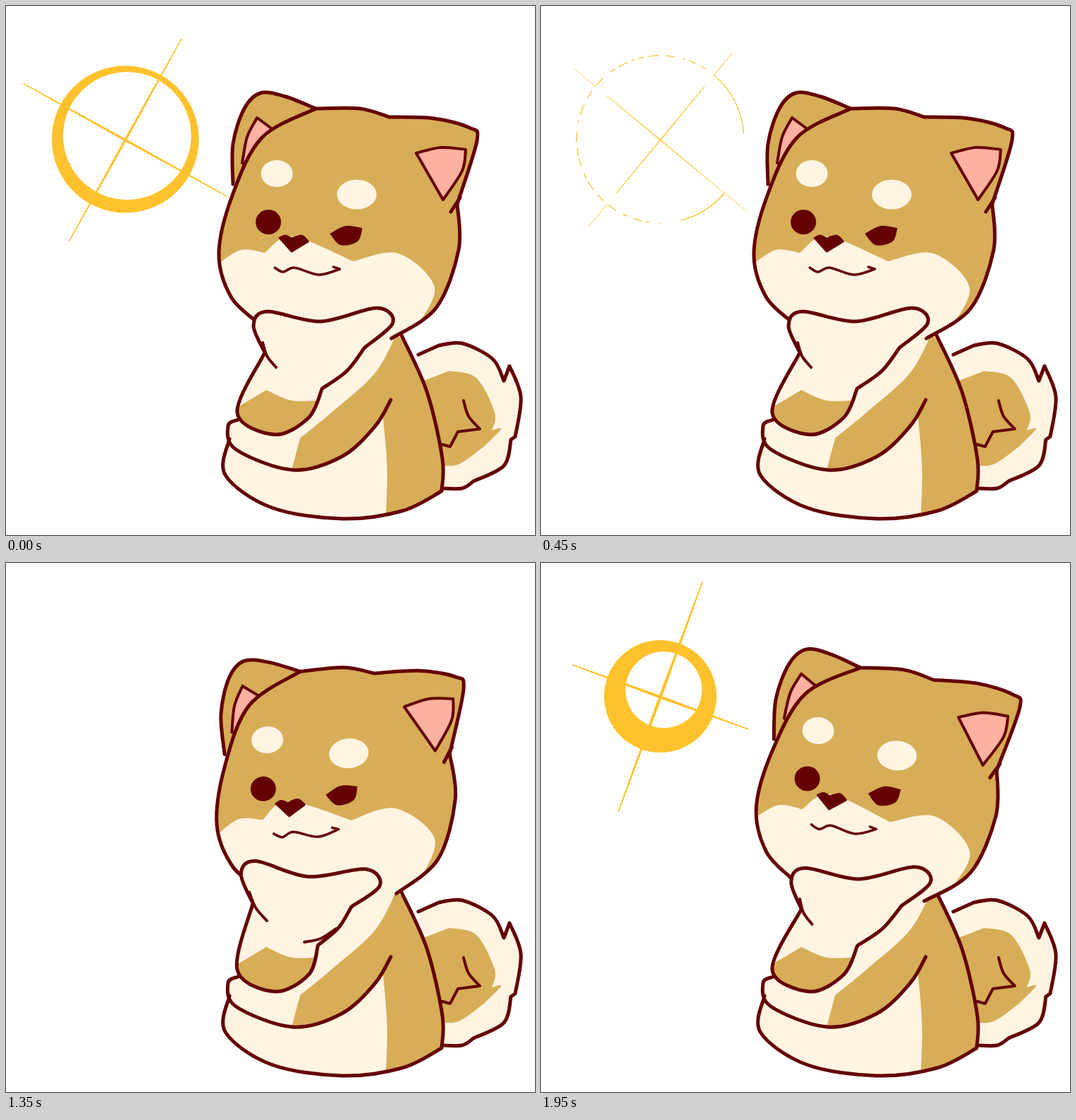
These frames come from a looping animation (748 px wide and 748 px high, 2100 ms). An HTML page with a canvas:

```html
<!DOCTYPE html>
<html lang="en">
<head>
<meta charset="utf-8">
<title>Thinking dog</title>
<style>
html, body { margin: 0; width: 100%; height: 100%; overflow: hidden; background: #fff; }
canvas { display: block; }
</style>
</head>
<body>
<canvas id="stage" width="748" height="748"></canvas>
<script>
const ctx = document.getElementById('stage').getContext('2d');
const TAN = '#d7ad57', CREAM = '#fff4e2', DARK = '#640000', PINK = '#ffb1a1', GOLD = '#ffc22c';
const STEP = 150, STEPS = 14;
const rad = deg => deg * Math.PI / 180;
const clamp = v => Math.max(0, Math.min(1, v));

// Smooth path through a few key points; a slash makes a corner.
function trace(text, move = p => p) {
  const path = new Path2D();
  let last = null;
  for (const part of text.split('/')) {
    const pts = part.trim().match(/\S+ \S+/g).map(p => move(p.split(' ').map(Number)));
    if (last) pts.unshift(last);
    else path.moveTo(...pts[0]);
    const at = i => pts[Math.max(0, Math.min(pts.length - 1, i))];
    for (let i = 0; i < pts.length - 1; i++) {
      const [a, b, c, d] = [-1, 0, 1, 2].map(k => at(i + k));
      path.bezierCurveTo(b[0] + (c[0] - a[0]) / 6, b[1] + (c[1] - a[1]) / 6,
        c[0] - (d[0] - b[0]) / 6, c[1] - (d[1] - b[1]) / 6, ...c);
    }
    last = pts.at(-1);
  }
  return path;
}

function fill(path, color) {
  ctx.fillStyle = color;
  ctx.fill(path);
}

function line(path, width = 5) {
  ctx.strokeStyle = DARK;
  ctx.lineWidth = width;
  ctx.stroke(path);
}

function patch(shape, area, color) {
  ctx.save();
  ctx.clip(shape);
  fill(area, color);
  ctx.restore();
}

function oval(x, y, rx, ry, color) {
  const path = new Path2D();
  path.ellipse(x, y, rx, ry, 0, 0, 7);
  fill(path, color);
}

const tail = {
  edge: trace('583 493 612 480 / 645 477 688 499 704 530 / 712 509 / 728 553 720 609 / 714 613 / 704 650 661 672 / 645 682 617 682'),
  patch: trace('585 532 627 516 / 665 526 691 575 687 600 / 700 598 677 622 / 640 648 610 649'),
  curl: trace('647 558 654 580 670 598 / 639 602 / 628 623 / 617 620')
};

const torso = '316 612 310 663 375 709 475 725 560 714 616 686 / 617 640 595 545 558 463';
const body = {
  edge: trace(torso),
  fill: trace(torso + ' / 500 440 / 370 480 / 370 590 / 328 585 314 594 316 612'),
  patch: trace('552 464 521 520 460 575 416 611 / 404 656 / 475 637 533 580 / 539 660 535 760 / 650 760 / 650 560'),
  arm: trace('328 585 314 594 325 627 405 656 475 637 522 594 544 557')
};

const head = {
  backEar: trace('321 252 321 195 337 145 360 123 395 128 438 145'),
  backPink: trace('334 222 341 185 355 158 / 382 178'),
  edge: trace('355 447 318 411 301 350 320 268 362 186 438 145 / 500 145 542 157 / 605 159 655 172 666 190 638 280 / 640 345 608 427 545 470'),
  earEnd: trace('642 271 629 291'),
  frontPink: trace('580 208 615 200 650 203 / 645 233 618 274 / 580 208'),
  muzzle: trace('298 366 332 345 366 349 / 405 326 491 361 / 555 350 606 398 578 457 / 545 480 / 340 480'),
  wink: trace('458 322 480 311 504 314 / 497 333 473 338 458 322'),
  nose: trace('387 328 395 325 404 329 / 418 325 427 333 / 404 347 / 387 328'),
  mouth: trace('380 370 392 376 408 370 442 380 472 372 / 463 369')
};

const PAW = '366 490 350 452 369 432 445 446 524 427 547 448 507 483 / 482 516 447 541 / 428 582 380 606 327 575 366 490';
const CREASE = '363 476 369 495 382 511';
const cuff = trace('318 573 368 543 / 405 558 450 557 / 450 620 / 318 620');

// The paw follows the chin; the shift fades out towards the elbow.
function pawShift(turn, dx, dy) {
  const cos = Math.cos(rad(turn)), sin = Math.sin(rad(turn));
  return ([x, y]) => {
    const u = x - 450, v = y - 440, k = clamp((560 - y) / 90);
    return [x + k * (u * cos - v * sin - u + dx), y + k * (u * sin + v * cos - v + dy)];
  };
}

function makePose(turn, pivot, shift, hatch) {
  return { turn, pivot, hatch: hatch && trace(hatch), paw: trace(PAW, shift), crease: trace(CREASE, shift) };
}

const rest = makePose(0, [0, 0]);
const back = makePose(-5.2, [520, 392], pawShift(6, -17, -2), '422 536 445 531 467 517');
const lean = makePose(2.9, [386, 414], pawShift(1.3, 4, 1));

function drawBody() {
  fill(tail.edge, CREAM);
  patch(tail.edge, tail.patch, TAN);
  line(tail.edge);
  line(tail.curl, 4);
  fill(body.fill, CREAM);
  patch(body.fill, body.patch, TAN);
  line(body.edge);
  line(body.arm);
}

function drawHead({ turn, pivot: [x, y] }) {
  ctx.save();
  ctx.translate(x, y);
  ctx.rotate(rad(turn));
  ctx.translate(-x, -y);
  fill(head.backEar, TAN);
  fill(head.backPink, PINK);
  line(head.backPink, 4);
  line(head.backEar);
  fill(head.edge, TAN);
  patch(head.edge, head.muzzle, CREAM);
  fill(head.frontPink, PINK);
  line(head.frontPink, 4);
  line(head.edge);
  line(head.earEnd);
  oval(383, 237, 22.5, 19, CREAM);
  oval(496, 266.5, 28, 21, CREAM);
  oval(371, 305.5, 18, 17.5, DARK);
  fill(head.wink, DARK);
  fill(head.nose, DARK);
  line(head.nose, 3);
  line(head.mouth, 3.5);
  ctx.restore();
}

function drawPaw({ paw, crease, hatch }) {
  fill(paw, CREAM);
  patch(paw, cuff, TAN);
  line(paw);
  line(crease, 4);
  if (hatch) line(hatch, 4);
}

// Spark: tilt and ray lengths at each stage of its life.
const TILT = [10, 20.1, 29, 37, 38.8, 39.6, 39.8];
const TALL = [143, 173, 164, 160, 159, 159, 159];
const WIDE = [77, 133, 165, 158, 165, 159, 159];
const BREAK = 5;

function drawRing(age) {
  const R = 119 - 39.5 * 0.38 ** (age - 1);
  const gap = 25.5 * 0.53 ** (age - 1);
  const hole = Math.max(0, R - gap);
  ctx.beginPath();
  ctx.arc(0, -1, R, 0, 7);
  if (hole) {
    ctx.moveTo(gap * 0.19 + hole, -gap * 0.36);
    ctx.arc(gap * 0.19, -gap * 0.36 - 1, hole, 0, 7);
  }
  ctx.fill('evenodd');
}

// Two whole arcs stay; the rest falls into random dashes.
function drawBrokenRing(age) {
  let seed = 7;
  const random = () => (seed = seed * 16807 % 2147483647) / 2147483647;
  const arc = (from, to) => {
    ctx.beginPath();
    ctx.arc(0, -1, 118.3, rad(from), rad(to));
    ctx.stroke();
  };
  if (age === BREAK) {
    arc(-50, -4);
    arc(40, 76);
  }
  for (let a = 90; a < 300; ) {
    const end = a + 1 + random() * (age === BREAK ? 7 : 3);
    arc(a, end);
    a = end + 1 + random() * 6;
  }
}

function drawRay(length, width, broken) {
  ctx.beginPath();
  ctx.moveTo(0, -width);
  ctx.lineTo(length, -width * 0.4);
  ctx.lineTo(length, width * 0.4);
  ctx.lineTo(0, width);
  ctx.fill();
  if (broken) {
    ctx.fillStyle = '#fff';
    ctx.fillRect(98, -3, 19, 6);
    ctx.fillStyle = GOLD;
  }
}

function drawSpark(age) {
  const broken = age >= BREAK;
  ctx.save();
  ctx.fillStyle = ctx.strokeStyle = GOLD;
  ctx.lineWidth = age > BREAK ? 0.8 : 1.3;
  ctx.lineCap = 'butt';
  ctx.translate(168.7, 189.5);
  ctx.save();
  ctx.rotate(rad(TILT[age]));
  for (let i = 0; i < 4; i++) {
    drawRay((i % 2 ? TALL : WIDE)[age], Math.max(0.7, 2.6 - 0.4 * age), broken && i > 0);
    ctx.rotate(Math.PI / 2);
  }
  ctx.restore();
  (broken ? drawBrokenRing : drawRing)(age);
  ctx.restore();
}

function draw(time) {
  const step = Math.floor(time / STEP) % STEPS;
  const age = (step + 2) % STEPS;
  const pose = step >= 12 ? lean : step === 9 || step === 10 ? back : rest;
  ctx.fillStyle = '#fff';
  ctx.fillRect(0, 0, 748, 748);
  ctx.lineCap = ctx.lineJoin = 'round';
  if (age < TILT.length) drawSpark(age);
  drawBody();
  drawHead(pose);
  drawPaw(pose);
}

const start = performance.now();
function tick() {
  draw(performance.now() - start);
  requestAnimationFrame(tick);
}
tick();
</script>
</body>
</html>
```
